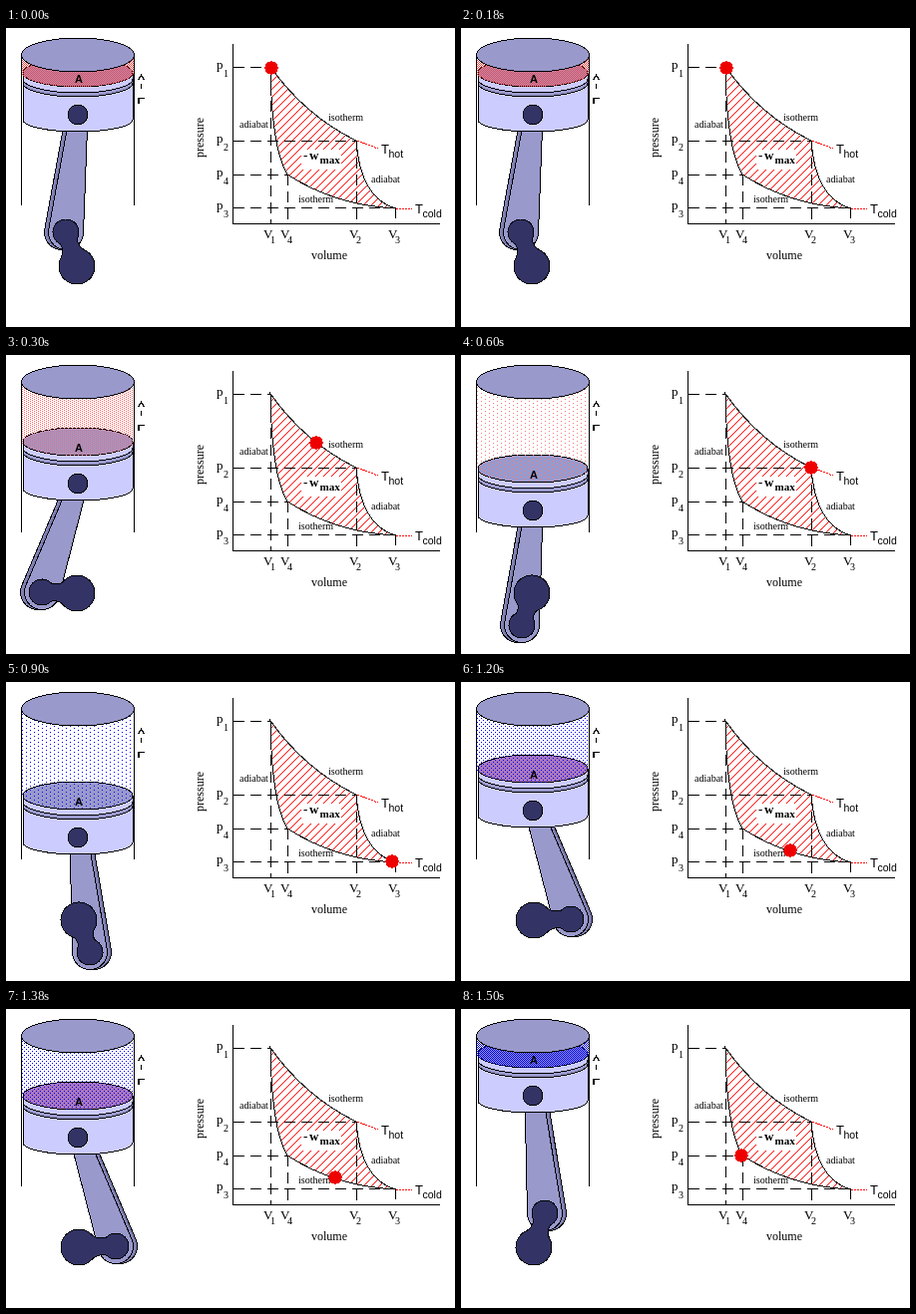
These frames come from a looping animation (450x300 px, 1800 ms). An HTML page:

```html
<!DOCTYPE html>
<html lang="en">
<head>
<meta charset="utf-8">
<title>Heat engine cycle</title>
<style>
html, body { margin: 0; width: 100%; height: 100%; overflow: hidden; background: #fff; }
svg { display: block; width: 450px; height: 300px; shape-rendering: crispEdges; }
text { font-family: "Liberation Serif", "Times New Roman", serif; font-size: 10px; }
.axis { font-size: 12px; text-anchor: middle; }
.sym { font-size: 13px; }
.sub { font-size: 10px; }
.sans, .sans tspan { font-family: "Liberation Sans", Arial, sans-serif; }
.bold { font-weight: bold; }
.line { fill: none; stroke: #000; }
.dash { fill: none; stroke: #000; stroke-dasharray: 11 6; }
.tail { stroke: #f00; stroke-dasharray: 2 1; }
.metal { fill: #99c; stroke: #000; }
.dark { fill: #336; stroke: #000; }
</style>
</head>
<body>
<svg viewBox="0 0 450 300">
  <defs id="dots"></defs>
  <defs>
    <pattern id="hatch" width="8" height="8" patternUnits="userSpaceOnUse">
      <path d="M-2 2L2 -2M-1 9L9 -1M6 10L10 6" stroke="#f00"/>
    </pattern>
  </defs>

  <!-- engine -->
  <path class="line" d="M15.5 27V178M128.5 27V178"/>
  <path id="rodBack" fill="#8080b3" stroke="#000"/>
  <path id="rod" class="metal"/>
  <path id="crank" class="dark"/>
  <g id="piston">
    <path d="M17 -42V5A55 12 0 0 0 127 5V-42Z" fill="#ccf" stroke="#000"/>
    <path d="M17 -36A55 14 0 0 0 127 -36V-32A55 14 0 0 1 17 -32Z" class="metal"/>
    <ellipse id="disc" cx="72" cy="-42" rx="55" ry="14" stroke="#000"/>
    <circle cx="72" r="10" class="dark"/>
  </g>
  <path id="gas"/>
  <ellipse cx="72" cy="27" rx="56.5" ry="17" class="metal"/>
  <text id="area" class="sans bold" x="73" text-anchor="middle" style="font-size:11px">A</text>
  <path class="line" stroke-width="1.6" d="M132.5 52L135.5 47.5L138.5 52M135.5 56V61M133 76V70.5H139"/>

  <!-- diagram -->
  <path d="M265 39Q300 88 351 113Q355 170 390 181Q330 178 282 147Q266 120 265 39Z" fill="url(#hatch)" stroke="#000"/>
  <rect x="296" y="122" width="40" height="20" fill="#fff"/>
  <path class="line" d="M227.5 16V196.5H435"/>
  <g id="guides"></g>
  <path class="tail" d="M352 113L373 121"/>
  <path class="tail" d="M391 181L407 182"/>
  <g id="labels"></g>
  <text class="axis" transform="translate(198 110) rotate(-90)">pressure</text>
  <text class="axis" x="324" y="232">volume</text>
  <text x="323" y="93">isotherm</text>
  <text x="293" y="175">isotherm</text>
  <text x="234" y="100">adiabat</text>
  <text x="366" y="155">adiabat</text>
  <text class="bold sym" y="132"><tspan x="298">-</tspan><tspan x="304">w</tspan><tspan x="314.5" y="136" font-size="11">max</tspan></text>
  <text class="sans" x="376" y="126" style="font-size:13px">T<tspan x="383.5" y="130" font-size="10.5">hot</tspan></text>
  <text class="sans" x="410" y="186" style="font-size:13px">T<tspan x="417.5" y="190" font-size="10.5">cold</tspan></text>
  <circle id="marker" r="6.7" fill="#e00"/>
</svg>
<script>
const $ = id => document.getElementById(id);
const set = (id, attrs) => {
  for (const key in attrs) $(id).setAttribute(key, attrs[key]);
};
const HOLD = 300;

// pin: piston pin height; crank: crank pin; side: shaded side of the rod; tile: gas dot spacing
const steps = [
  { pin: 87,  shaft: 71, crank: [60, 205],  side: -4, state: [266, 40],  disc: '#99c', color: '#f44', tile: [2, 2] },
  { pin: 129, shaft: 71, crank: [36, 238],  side: -4, state: [311, 88],  disc: '#99c', color: '#f66', tile: [4, 2] },
  { pin: 156, shaft: 71, crank: [61, 271],  side: -4, state: [351, 113], disc: '#99c', color: '#f77', tile: [8, 4] },
  { pin: 156, shaft: 73, crank: [84, 271],  side: 4,  state: [387, 180], disc: '#99c', color: '#00f', tile: [8, 4] },
  { pin: 129, shaft: 73, crank: [110, 238], side: 4,  state: [330, 169], disc: '#a7b', color: '#00f', tile: [4, 4] },
  { pin: 87,  shaft: 73, crank: [84, 205],  side: 4,  state: [281, 147], disc: '#99c', color: '#00f', tile: [2, 2] }
];

$('dots').innerHTML = steps.map(({ color, tile: [w, h] }, i) =>
  `<pattern id="dots${i}" width="${w}" height="${h}" patternUnits="userSpaceOnUse">` +
  `<path d="M0 0h1v1h-1zM${w / 2} ${h / 2}h1v1h-1z" fill="${color}"/></pattern>`).join('');

const polar = (x, y, r, a) => [x + r * Math.cos(a), y + r * Math.sin(a)];

// Outline of two circles joined by their outer tangents
function rodPath(x1, y1, r1, x2, y2, r2) {
  const a = Math.atan2(y2 - y1, x2 - x1);
  const b = Math.acos((r1 - r2) / Math.hypot(x2 - x1, y2 - y1));
  return `M${polar(x1, y1, r1, a + b)}L${polar(x2, y2, r2, a + b)}` +
    `A${r2} ${r2} 0 1 0 ${polar(x2, y2, r2, a - b)}` +
    `L${polar(x1, y1, r1, a - b)}A${r1} ${r1} 0 0 0 ${polar(x1, y1, r1, a + b)}Z`;
}

// Two discs with a waisted neck
function crankPath(x1, y1, r1, x2, y2, r2) {
  const a = Math.atan2(y2 - y1, x2 - x1), w = 0.75;
  const mid = [(x1 + x2) / 2, (y1 + y2) / 2];
  return `M${polar(x1, y1, r1, a + w)}Q${polar(...mid, 7, a + Math.PI / 2)} ${polar(x2, y2, r2, a + Math.PI - w)}` +
    `A${r2} ${r2} 0 1 0 ${polar(x2, y2, r2, a + Math.PI + w)}` +
    `Q${polar(...mid, 7, a - Math.PI / 2)} ${polar(x1, y1, r1, a - w)}` +
    `A${r1} ${r1} 0 1 0 ${polar(x1, y1, r1, a + w)}Z`;
}

const corners = [[265, 39, 1], [351, 113, 2], [390, 180, 3], [282, 147, 4]];
$('guides').innerHTML = corners.map(([x, y]) =>
  `<path class="dash" d="M228 ${y}.5H${x}"/><path class="dash" d="M${x}.5 ${y}V196"/>`).join('');
const label = (letter, n, x, y, drop) =>
  `<text class="sym" x="${x}" y="${y}">${letter}<tspan class="sub" x="${x + 7}" y="${y + drop}">${n}</tspan></text>`;
$('labels').innerHTML = corners.map(([x, y, n]) =>
  label('p', n, 211, y + 2, 8) + label('V', n, x - 7, 211, 5)).join('');

let shown = -1;
function show(i) {
  const { pin, shaft, crank: [x, y], side, state, disc } = steps[i];
  const rod = dx => rodPath(73 + dx, pin, 9, x + dx, y, 17.5);
  set('rodBack', { d: rod(side) });
  set('rod', { d: rod(0) });
  set('crank', { d: crankPath(shaft, 239, 18, x, y, 13) });
  set('piston', { transform: `translate(0 ${pin})` });
  set('disc', { fill: disc });
  set('gas', { d: `M16 27V${pin - 42}A56 14 0 0 0 128 ${pin - 42}V27Z`, fill: `url(#dots${i})` });
  set('area', { y: pin - 32 });
  set('marker', { cx: state[0], cy: state[1] });
}

const start = performance.now();
function tick() {
  const i = Math.floor(Math.max(0, performance.now() - start) / HOLD) % steps.length;
  if (i !== shown) show(shown = i);
  requestAnimationFrame(tick);
}
tick();
</script>
</body>
</html>
```
